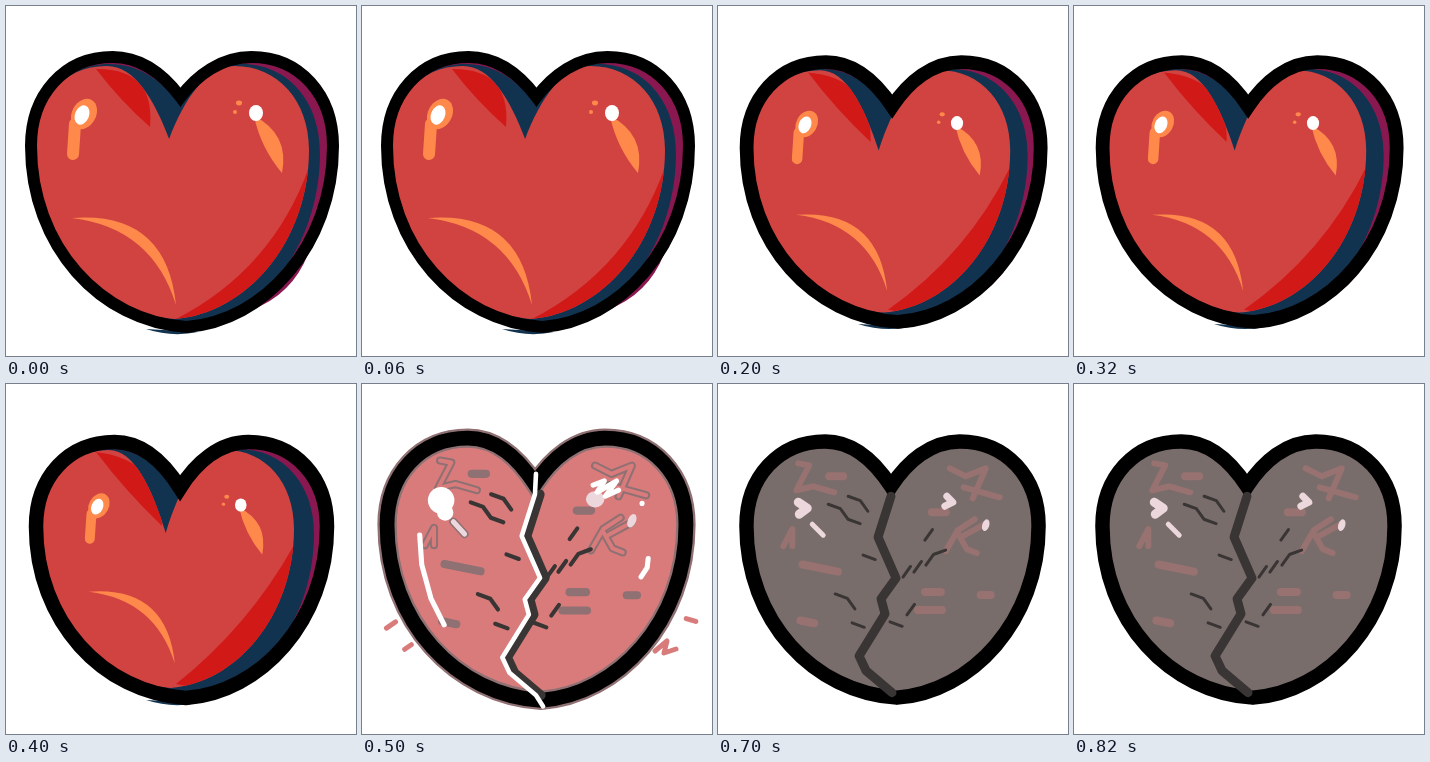
Animation of 350x350 px, one loop 900 ms. Source, as an HTML page with a canvas:

```html
<!DOCTYPE html>
<html lang="en">
<head>
<meta charset="utf-8">
<title>Breaking heart</title>
<style>
html, body { margin: 0; width: 100%; height: 100%; overflow: hidden; background: #fff; }
canvas { display: block; width: 100vw; height: 100vh; }
</style>
</head>
<body>
<canvas id="stage" width="350" height="350"></canvas>
<script>
const ctx = document.getElementById('stage').getContext('2d');
const C = {
  face: '#d14341', red: '#d11a18', navy: '#12334f', plum: '#891850', glow: '#ff894a',
  pink: '#d97b7b', rose: '#8f7073', stone: '#796d6c', dark: '#393534', mauve: '#977270', pale: '#ecd8dc'
};
ctx.lineCap = 'round';

// Heart fitted to a box, with its notch at height c
function heart(l, t, r, b, c) {
  const w = r - l, X = u => l + u * w, Y = v => t + v * (b - t);
  const path = new Path2D(), shoulder = t + (c - t) * .45;
  path.moveTo(X(.495), c);
  path.bezierCurveTo(X(.44), shoulder, X(.37), t, X(.27), t);
  path.bezierCurveTo(X(.11), t, l, Y(.14), l, Y(.33));
  path.bezierCurveTo(l, Y(.7), X(.23), Y(.98), X(.515), b);
  path.bezierCurveTo(X(.77), Y(.98), r, Y(.7), r, Y(.33));
  path.bezierCurveTo(r, Y(.14), X(.89), t, X(.73), t);
  path.bezierCurveTo(X(.63), t, X(.55), shoulder, X(.495), c);
  path.closePath();
  return path;
}

function fill(color, path) {
  ctx.fillStyle = color;
  ctx.fill(path);
}

function outline(path, width, color = '#000') {
  ctx.lineJoin = 'miter';
  ctx.strokeStyle = color;
  ctx.lineWidth = width;
  ctx.stroke(path);
}

function within(path, paint) {
  ctx.save();
  ctx.clip(path);
  paint();
  ctx.restore();
}

function zoom(s, x, y) {
  ctx.translate(x, y);
  ctx.scale(s, s);
  ctx.translate(-x, -y);
}

// Lens between two points, each side bowed by its own amount
function leaf(color, x0, y0, x1, y1, bowA, bowB) {
  const dx = x1 - x0, dy = y1 - y0, len = Math.hypot(dx, dy);
  const ctrl = bow => [(x0 + x1) / 2 - dy / len * bow, (y0 + y1) / 2 + dx / len * bow];
  const path = new Path2D();
  path.moveTo(x0, y0);
  path.quadraticCurveTo(...ctrl(bowA), x1, y1);
  path.quadraticCurveTo(...ctrl(bowB), x0, y0);
  fill(color, path);
}

function line(color, width, ...p) {
  ctx.lineJoin = 'round';
  ctx.strokeStyle = color;
  ctx.lineWidth = width;
  ctx.beginPath();
  for (let i = 0; i < p.length; i += 2) ctx.lineTo(p[i], p[i + 1]);
  ctx.stroke();
}

function dash(color, width, x, y, len, angle) {
  const dx = Math.cos(angle) * len / 2, dy = Math.sin(angle) * len / 2;
  line(color, width, x - dx, y - dy, x + dx, y + dy);
}

function oval(color, x, y, rx, ry = rx, turn = 0) {
  const path = new Path2D();
  path.ellipse(x, y, rx, ry, turn, 0, 7);
  fill(color, path);
}

function shine() {
  oval(C.glow, 78, 108, 12, 16, .5);
  line(C.glow, 12, 69, 118, 67, 148);
  oval('#fff', 76, 109, 7, 10, .4);
  leaf(C.glow, 66, 212, 170, 299, -44, -66);
  leaf(C.glow, 248, 110, 276, 167, -24, 8);
  oval('#fff', 250, 107, 7, 8);
  oval(C.glow, 233, 97, 3, 2.4);
  oval(C.glow, 229, 106, 2);
}

// Beating heart: k runs from squeezed (0) to swollen (1)
function alive(k) {
  const mix = (a, b) => a + (b - a) * k;
  const [l, t, r, b, c] = [mix(30, 25), mix(58, 51), mix(321, 327), mix(314, 321), mix(104, 91)];
  const shell = heart(l, t, r, b, c);
  const face = heart(mix(34, 26), mix(66, 60), mix(288, 303), mix(304, 313), mix(149, 133));
  leaf(C.plum, r - 25, b - 73, r - 82, b - 17, -18, 0);
  leaf(C.navy, 140, b + 2, 192, b + 5, 7, 0);
  fill(C.plum, shell);
  within(shell, () => {
    fill(C.navy, heart(l, t + 7, r - 13, b + 6, c));
    fill(C.face, face);
    within(face, () => {
      leaf(C.red, 90, mix(68, 63), mix(156, 144), mix(142, 121), 4, -44);
      leaf(C.red, mix(288, 303), 161, 170, mix(300, 313), mix(-18, -40), -170);
    });
    zoom(mix(.825, 1), 163, 187);
    shine();
  });
  outline(shell, mix(14.5, 12));
}

const crack = [173, 112, 160, 153, 178, 194, 163, 215, 167, 230, 141, 272, 148, 287, 174, 309];
// Where each small crack starts, and its number of bends
const creases = [
  [130, 112, 2], [110, 120, 3], [145, 171, 1], [117, 210, 2], [134, 239, 1], [172, 238, 1],
  [207, 156, 1], [208, 181, 2], [185, 193, 1], [196, 188, 1], [189, 231, 1]
];
const scrawls = [
  [80, 79, 91, 81, 78, 106, 95, 102, 116, 108], [65, 162, 74, 145, 74, 162],
  [232, 84, 248, 92, 268, 84, 255, 114], [246, 103, 282, 113],
  [228, 167, 240, 146, 257, 135], [240, 149, 249, 165, 259, 169], [245, 152, 267, 140]
];
// Middle and length of each scratch
const scratches = [[118, 92, 14], [102, 184, 36], [89, 238, 14], [221, 128, 14], [215, 208, 16], [212, 226, 24], [268, 211, 10]];

function crease(x, y, bends, width) {
  const path = [x, y], tilt = x < 180 ? .55 : -.75;
  for (let i = 0; i < bends; i++) {
    const angle = tilt + (i % 2 ? .4 : -.2);
    path.push(x += 13 * Math.cos(angle), y += 13 * Math.sin(angle));
  }
  line(C.dark, width, ...path);
}

// Broken heart: hot at the moment it splits, grey afterwards
function broken(size, hot) {
  const shell = heart(28, 57, 321, 314, 102);
  zoom(size, 175, 200);
  fill(hot ? C.pink : C.stone, shell);
  if (hot) outline(shell, 19, C.rose);
  const ink = hot ? C.rose : C.mauve;
  for (const s of scrawls) line(ink, hot ? 8 : 6, ...s);
  if (hot) for (const s of scrawls) line(C.pink, 4, ...s);
  for (const [x, y, len] of scratches) dash(ink, 8, x, y, len, x < 110 ? .2 : 0);
  for (const [x, y, bends] of creases) crease(x, y, bends, hot ? 4 : 3);
  outline(shell, 14.5);
  ctx.save();
  ctx.translate(hot ? 5 : 0, 0);
  line(C.dark, 9, ...crack);
  ctx.restore();
  if (hot) flash(); else glints();
}

function glints() {
  line(C.pale, 9, 80, 118, 89, 124, 81, 130);
  line(C.pale, 5, 94, 140, 105, 151);
  line(C.pale, 7, 227, 122, 235, 118, 229, 112);
  oval(C.pale, 268, 141, 3.5, 6, .3);
}

function flash() {
  line('#fff', 4.5, 174, 92, ...crack, 181, 320);
  oval('#fff', 81, 118, 13);
  oval('#fff', 85, 130, 8);
  line(C.rose, 8, 93, 139, 104, 151);
  line(C.pale, 5, 93, 139, 104, 151);
  line('#fff', 5, 60, 152, 62, 181, 71, 214, 84, 240);
  line('#fff', 5, 284, 175, 283, 184, 277, 193);
  oval(C.pale, 232, 117, 9, 8);
  line('#fff', 5, 230, 103, 241, 99, 234, 110, 253, 99, 242, 114, 255, 108);
  oval(C.pale, 268, 138, 4, 7, .4);
  oval('#fff', 278, 121, 2.5);
}

function sparks() {
  dash(C.pink, 5, 29, 241, 11, -.6);
  dash(C.pink, 5, 46, 263, 8, -.6);
  dash(C.pink, 5, 329, 236, 10, .3);
  line(C.pink, 5, 293, 267, 305, 257, 302, 269, 314, 265);
}

function shard(x, y, size, turn) {
  const p = [];
  for (let i = 0; i < 4; i++) p.push(x + size * Math.cos(turn + i * 2.1), y + size * Math.sin(turn + i * 2.1));
  line('#000', 5, ...p);
  ctx.fillStyle = C.stone;
  ctx.fill();
}

function shards() {
  dash('#000', 5, 31, 57, 14, .7);
  leaf(C.mauve, 315, 76, 337, 82, -24, 8);
  leaf('#000', 315, 76, 339, 78, -20, -6);
  oval('#000', 333, 91, 3, 2.5);
  shard(42, 284, 13, 3.1);
  shard(311, 299, 17, 2.4);
}

// Time at which each pose ends
const poses = [
  [100, () => alive(1)],
  [200, () => alive(0)],
  [400, () => alive(.28)],
  [500, () => alive(0)],
  [600, () => { sparks(); broken(1.02, true); }],
  [700, () => { shards(); broken(1, false); }],
  [900, () => broken(.997, false)]
];

let shown;
function frame(now) {
  const time = now % 900, pose = poses.find(p => time < p[0]);
  if (pose !== shown) {
    shown = pose;
    ctx.fillStyle = '#fff';
    ctx.fillRect(0, 0, 350, 350);
    ctx.save();
    pose[1]();
    ctx.restore();
  }
  requestAnimationFrame(frame);
}
frame(0);
</script>
</body>
</html>
```
